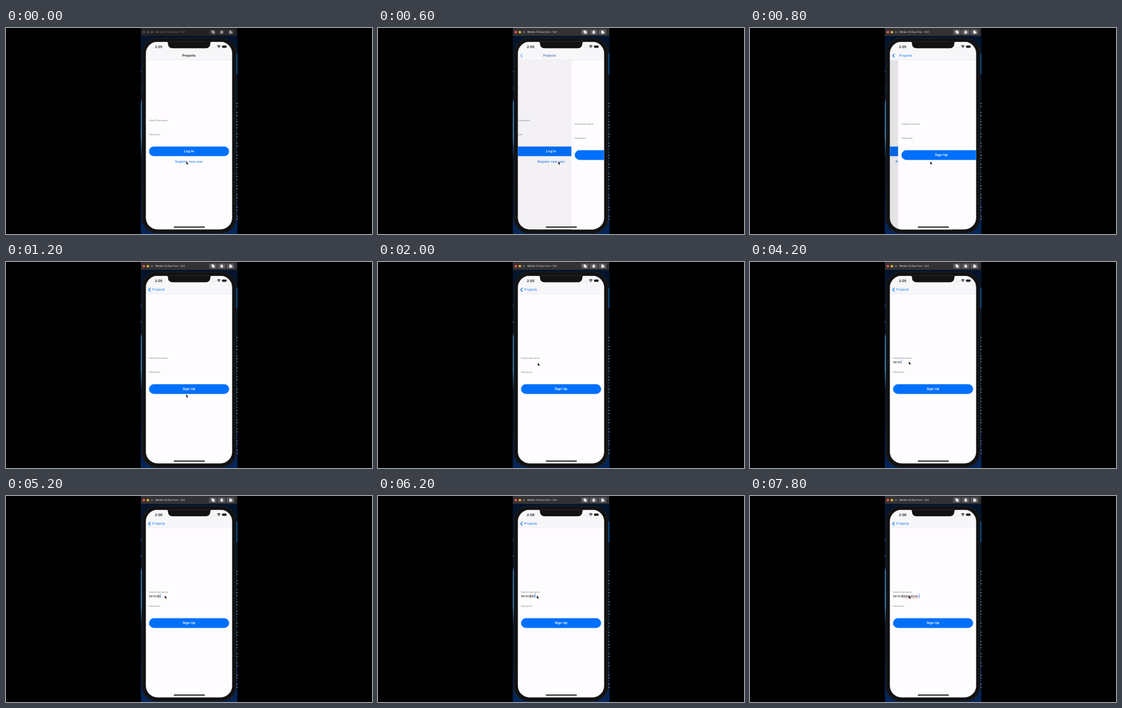
Recreate the animation shown at these times as an HTML page with a canvas. Size 600 px wide and 338 px high, loop 8000 ms.

```html
<!DOCTYPE html>
<html lang="en">
<head>
<meta charset="utf-8">
<title>Sign up flow</title>
<style>
html, body { margin: 0; width: 100%; height: 100%; overflow: hidden; background: #000; }
canvas { display: block; width: 600px; height: 338px; }
</style>
</head>
<body>
<canvas id="stage"></canvas>
<script>
const LOOP = 8000, TICK = 200;
const FONT = 'Inter, Roboto, sans-serif';
const BLUE = '#0070fc', INK = '#161618', PAPER = '#fefcff', BEZEL = '#121213';
const SCREEN = { x: 229, y: 22.6, w: 142, h: 307.8, r: 19 };
const NAV_END = 53;

const canvas = document.getElementById('stage');
const ctx = canvas.getContext('2d');
const dpr = window.devicePixelRatio || 1;
canvas.width = 600 * dpr;
canvas.height = 338 * dpr;
ctx.textRendering = 'geometricPrecision';

// [time, value] steps; each value holds until the next one
const PUSH = [[0, 0], [600, 0.38], [800, 0.903], [1000, 0.985], [1200, 1]];
const POINTER = [
  [0, [295.6, 219]], [1200, [295.4, 217.3]], [1400, [293, 213]], [1600, [283, 196]],
  [1800, [270, 176]], [2000, [262, 165.5]], [2200, [260.4, 163.3]]
];
const ADDRESS = 'teron@blandiver.';
const NAME_LENGTH = 6;
const TYPED = [
  [0, 0], [3000, 1], [3200, 2], [3600, 3], [4000, 4], [4200, 5], [5000, 6], [6000, 7],
  [6200, 8], [6400, 9], [6600, 10], [6800, 11], [7000, 12], [7200, 13], [7400, 14],
  [7600, 15], [7800, 16]
];

function at(steps, t) {
  let value = steps[0][1];
  for (const [time, v] of steps) if (t >= time) value = v;
  return value;
}

const mix = (a, b, p) => a + (b - a) * p;

function rect(x, y, w, h, color) {
  ctx.fillStyle = color;
  ctx.fillRect(x, y, w, h);
}

function roundPath(x, y, w, h, r) {
  ctx.beginPath();
  ctx.moveTo(x + r, y);
  ctx.arcTo(x + w, y, x + w, y + h, r);
  ctx.arcTo(x + w, y + h, x, y + h, r);
  ctx.arcTo(x, y + h, x, y, r);
  ctx.arcTo(x, y, x + w, y, r);
  ctx.closePath();
}

function pill(x, y, w, h, r, color) {
  roundPath(x, y, w, h, r);
  ctx.fillStyle = color;
  ctx.fill();
}

function dot(x, y, r, color) {
  ctx.beginPath();
  ctx.arc(x, y, r, 0, Math.PI * 2);
  ctx.fillStyle = color;
  ctx.fill();
}

function text(str, x, y, size, color, weight = 400, align = 'left') {
  ctx.font = `${weight} ${size}px ${FONT}`;
  ctx.fillStyle = color;
  ctx.textAlign = align;
  ctx.fillText(str, x, y);
}

function fade(x, y, w, h, stops) {
  const gradient = ctx.createLinearGradient(0, y, 0, y + h);
  stops.forEach(([p, c]) => gradient.addColorStop(p, c));
  rect(x, y, w, h, gradient);
}

function desktop() {
  fade(221, 13, 158.5, 325, [[0, '#03142c'], [0.4, '#041628'], [0.75, '#04142a'], [1, '#05265a']]);
  fade(221, 116, 1.7, 96, [[0, '#3a8fd000'], [0.08, '#3a8fd0'], [0.65, '#4b9fd8'], [1, '#3a8fd000']]);
  rect(221, 70, 1.5, 3, '#0d4d8c');
  rect(221, 97, 1.5, 3, '#0d4d8c');
  rect(377.6, 42, 1.6, 34, '#0d5aa0');
  for (let y = 123; y < 318; y += 5) {
    const wide = Math.abs(Math.sin(y * 1.7));
    rect(378, y, 0.6 + wide, 1.4, wide > 0.5 ? '#9aa3ab' : '#4a5560');
  }
}

function titleBar(active) {
  rect(221, 0, 158, 13, active ? '#323134' : '#222123');
  const idle = active ? '#59595a' : '#504f52';
  const lights = active ? ['#f4564f', '#e9b13b', idle] : [idle, idle, idle];
  lights.forEach((c, i) => dot(226 + i * 6.6, 6.8, 2.1, c));
  text('Mirelo 12 Duo Fox – 14.1', 245, 8.3, 4.35, active ? '#cfced1' : '#727174', 500);

  const icon = active ? '#e2e2e4' : '#98989b';
  [333, 347.3, 361.7].forEach(x => pill(x, 2.2, 12.6, 8.8, 1.5, active ? '#58575b' : '#333235'));
  rect(336.8, 4, 4, 4, icon);
  rect(338.2, 5.5, 4, 4, icon);
  ctx.beginPath();
  ctx.moveTo(350.6, 6.6);
  ctx.lineTo(353.7, 3.6);
  ctx.lineTo(356.8, 6.6);
  ctx.closePath();
  ctx.fill();
  rect(351.6, 6.3, 4.2, 3, icon);
  pill(366, 4, 3.6, 5.5, 0.8, icon);
  rect(368, 6, 3.2, 3, icon);
}

function phoneBody() {
  pill(222.6, 16.2, 154.8, 321, 25, '#242426');
  pill(223.3, 16.9, 153.4, 319.6, 24.5, BEZEL);
}

function field(label, x, y) {
  text(label, x, y + 1.4, 3.95, '#828286');
}

function button(label, x, y) {
  pill(x + 5.5, y, 131.2, 15.8, 7.9, BLUE);
  text(label, x + 71, y + 9.8, 5.6, '#fff', 600, 'center');
}

function loginPage(shift, pressed) {
  const x = SCREEN.x + shift;
  rect(x, NAV_END, SCREEN.w, 278, PAPER);
  field('Email/Username', x + 5.5, 152);
  field('Password', x + 5.5, 174.7);
  button('Log In', x, 194.5);
  ctx.globalAlpha = pressed ? 0.35 : 1;
  text('Register new user', x + 71, 221.1, 5.35, BLUE, 400, 'center');
  ctx.globalAlpha = 1;
}

function signUpPage(shift, t) {
  const x = SCREEN.x + shift;
  rect(x, NAV_END, SCREEN.w, 278, PAPER);
  field('Email/Username', x + 5.5, 158);
  field('Password', x + 5.5, 180.7);
  button('Sign Up', x, 200.6);
  if (t >= 2600) entry(x + 5.5, t);
}

function entry(x, t) {
  const count = at(TYPED, t);
  const typed = ADDRESS.slice(0, count);
  text(typed, x, 166, 5.3, INK);
  const end = ctx.measureText(typed).width;
  if (count === ADDRESS.length) {
    const from = ctx.measureText(ADDRESS.slice(0, NAME_LENGTH)).width;
    const to = ctx.measureText(ADDRESS.slice(0, -1)).width;
    ctx.strokeStyle = '#e5484d';
    ctx.lineWidth = 0.8;
    ctx.setLineDash([0.9, 0.4]);
    ctx.beginPath();
    ctx.moveTo(x + from, 167.2);
    ctx.lineTo(x + to, 167.2);
    ctx.stroke();
    ctx.setLineDash([]);
  }
  rect(x + end + 0.2, 160.4, 0.8, 7, '#3f83ee');
}

function navBar(p) {
  rect(SCREEN.x, SCREEN.y, SCREEN.w, NAV_END - SCREEN.y, '#f7f6f9');
  rect(SCREEN.x, NAV_END - 0.4, SCREEN.w, 0.4, '#dddce0');
  const left = mix(289, 240, p);
  ctx.globalAlpha = Math.max(0, 1 - p * 1.6);
  text('Projects', left, 47.4, 5.5, INK, 600);
  ctx.globalAlpha = Math.min(1, p * 1.4);
  text('Projects', left, 47.4, 5.4, BLUE);
  ctx.strokeStyle = BLUE;
  ctx.lineWidth = 1.1;
  ctx.beginPath();
  ctx.moveTo(237, 42.3);
  ctx.lineTo(233.9, 45.5);
  ctx.lineTo(237, 48.7);
  ctx.stroke();
  ctx.globalAlpha = 1;
}

function statusBar(t) {
  text(t >= 4600 ? '2:06' : '2:05', 244, 32.7, 5.7, INK, 600);
  for (let i = 0; i < 4; i++) dot(338.2 + i * 1.7, 31.9, 0.5, '#c4c4c7');
  ctx.strokeStyle = INK;
  ctx.lineWidth = 0.9;
  for (const r of [1.7, 3, 4.2]) {
    ctx.beginPath();
    ctx.arc(348.9, 32.7, r, -Math.PI * 0.75, -Math.PI * 0.25);
    ctx.stroke();
  }
  dot(348.9, 32.1, 0.7, INK);
  pill(354.2, 28.7, 7.3, 3.8, 1, INK);
  rect(361.8, 29.9, 0.5, 1.4, '#77777a');
}

function notch() {
  ctx.beginPath();
  ctx.moveTo(263, 22);
  ctx.lineTo(263, 22.6);
  ctx.quadraticCurveTo(265.5, 22.6, 265.5, 25.5);
  ctx.quadraticCurveTo(265.8, 33.2, 273, 33.2);
  ctx.lineTo(327.5, 33.2);
  ctx.quadraticCurveTo(334.7, 33.2, 335, 25.5);
  ctx.quadraticCurveTo(335, 22.6, 337.5, 22.6);
  ctx.lineTo(337.5, 22);
  ctx.closePath();
  ctx.fillStyle = BEZEL;
  ctx.fill();
}

function pointer([x, y]) {
  const shape = [[0, 0], [0, 4.7], [1.1, 3.8], [1.9, 5.6], [2.7, 5.2], [1.9, 3.5], [3.3, 3.4]];
  ctx.beginPath();
  shape.forEach(([dx, dy]) => ctx.lineTo(x + dx, y + dy));
  ctx.closePath();
  ctx.strokeStyle = '#fff';
  ctx.lineWidth = 0.8;
  ctx.stroke();
  ctx.fillStyle = '#08080a';
  ctx.fill();
}

function phoneScreen(t) {
  const p = at(PUSH, t);
  ctx.save();
  roundPath(SCREEN.x + 0.3, SCREEN.y, SCREEN.w - 0.6, SCREEN.h, SCREEN.r);
  ctx.clip();
  if (p < 1) {
    loginPage(-0.3 * SCREEN.w * p, t === 400);
    rect(SCREEN.x, NAV_END, SCREEN.w, 278, `rgba(0, 0, 0, ${0.11 * p})`);
  }
  if (p > 0) signUpPage(SCREEN.w * (1 - p), t);
  navBar(p);
  statusBar(t);
  notch();
  pill(275, 325.8, 51, 1.7, 0.8, '#08080a');
  ctx.restore();
}

function draw(t) {
  ctx.setTransform(dpr, 0, 0, dpr, 0, 0);
  rect(0, 0, 600, 338, '#000');
  desktop();
  phoneBody();
  titleBar(t >= 200);
  phoneScreen(t);
  pointer(at(POINTER, t));
}

const start = performance.now();
function loop() {
  const t = (performance.now() - start) % LOOP;
  draw(Math.floor(t / TICK) * TICK);
  requestAnimationFrame(loop);
}
loop();
</script>
</body>
</html>
```
